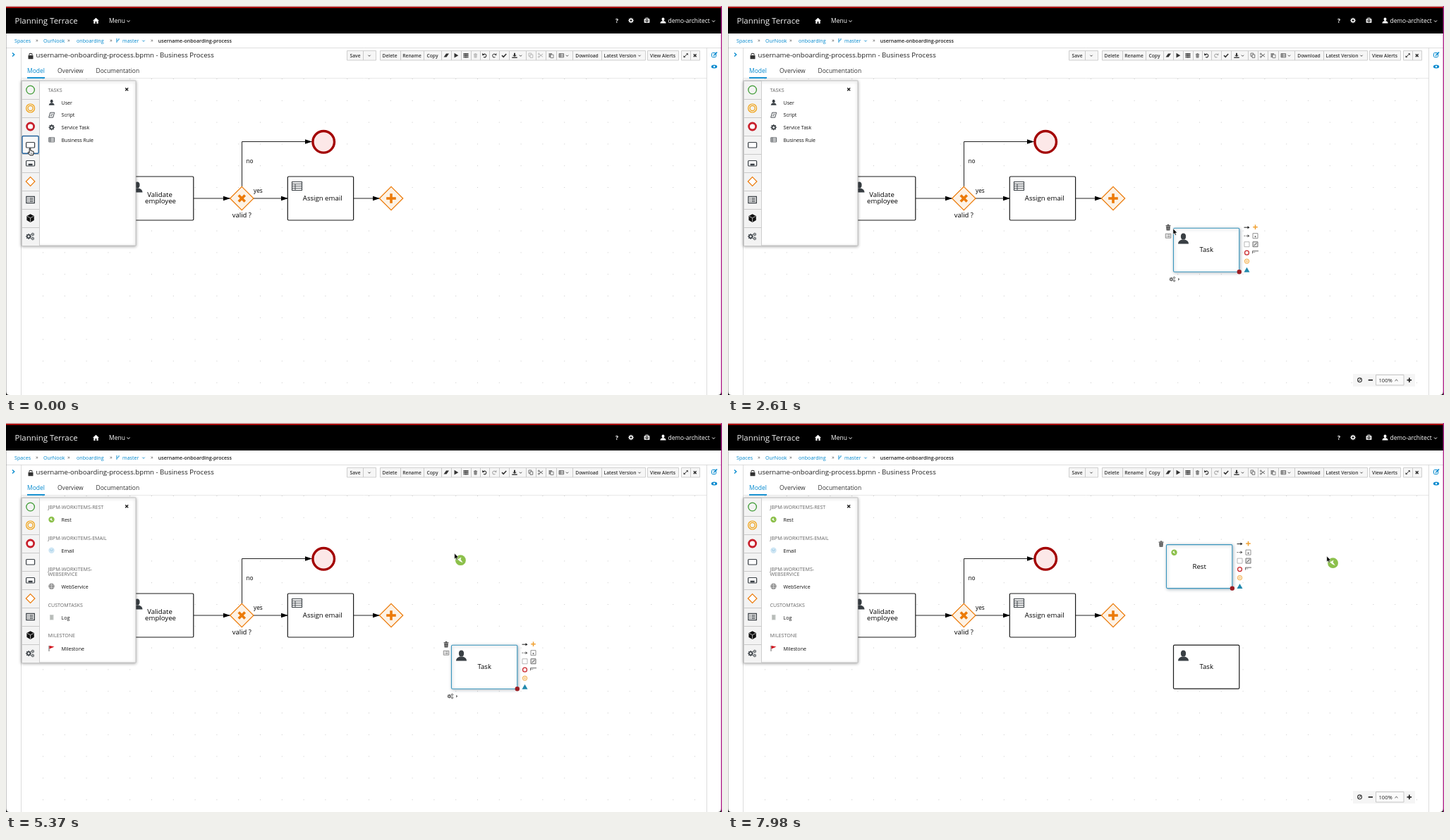
Animation, 1015 px wide and 552 px high, one loop 8000 ms. Source, as an HTML page with a canvas:

```html
<!DOCTYPE html>
<html lang="en">
<head>
<meta charset="utf-8">
<title>Process editor</title>
<style>
html, body { margin: 0; width: 100%; height: 100%; overflow: hidden; background: #fff; }
canvas { display: block; width: 1015px; height: 552px; }
</style>
</head>
<body>
<canvas id="stage"></canvas>
<script>
const W = 1015, H = 552, LOOP = 8000;
const canvas = document.getElementById('stage');
const c = canvas.getContext('2d');
const dpr = window.devicePixelRatio || 1;
canvas.width = W * dpr;
canvas.height = H * dpr;

const BLUE = '#0088ce', INK = '#393f44', ORANGE = '#ec7a08', RED = '#a30000', GREEN = '#8cc04b';

// Cursor path: time, x, y. Repeated points are pauses.
const path = [
  [0, 34, 202], [210, 34, 202], [570, 88, 137], [750, 88, 137], [810, 90, 138], [1080, 90, 138],
  [1950, 626, 215], [2420, 631, 316], [2700, 631, 316], [3300, 480, 333], [3850, 34, 324],
  [4290, 34, 324], [4410, 90, 191], [4640, 87, 139], [4930, 87, 139], [5370, 635, 185],
  [5640, 621, 173], [5970, 621, 173], [6780, 110, 141], [7200, 110, 141], [7980, 848, 189], [8000, 849, 189]
];
const drags = [[1100, 2480, 'user'], [4950, 5700, 'rest'], [7220, 8001, 'rest']];
const DROP_TASK = 2490, DROP_REST = 5700, OPEN_CUSTOM = 3930;

const clamp = v => Math.max(0, Math.min(1, v));
const ramp = (t, a, b) => clamp((t - a) / (b - a));

function slope(i, k) {
  const p = path[i - 1], q = path[i], r = path[i + 1];
  if (!p || !r) return 0;
  const still = (a, b) => a[1] === b[1] && a[2] === b[2];
  return still(p, q) || still(q, r) ? 0 : (r[k] - p[k]) / (r[0] - p[0]);
}

function cursorAt(t) {
  let i = 0;
  while (i < path.length - 2 && path[i + 1][0] <= t) i++;
  const a = path[i], b = path[i + 1], d = b[0] - a[0], u = clamp((t - a[0]) / d);
  return [1, 2].map(k => {
    const u2 = u * u, u3 = u2 * u;
    return (2 * u3 - 3 * u2 + 1) * a[k] + (u3 - 2 * u2 + u) * d * slope(i, k) +
      (3 * u2 - 2 * u3) * b[k] + (u3 - u2) * d * slope(i + 1, k);
  });
}

// Drawing helpers
function paint(fill, stroke, w = 1) {
  if (fill) { c.fillStyle = fill; c.fill(); }
  if (stroke) { c.strokeStyle = stroke; c.lineWidth = w; c.stroke(); }
}
function rect(x, y, w, h, fill, stroke, lw, r = 0) {
  c.beginPath();
  c.roundRect(x, y, w, h, r);
  paint(fill, stroke, lw);
}
function disc(x, y, r, fill, stroke, lw) {
  c.beginPath();
  c.arc(x, y, r, 0, 7);
  paint(fill, stroke, lw);
}
function poly(pts, fill, stroke, lw, open) {
  c.beginPath();
  for (let i = 0; i < pts.length; i += 2) c.lineTo(pts[i], pts[i + 1]);
  if (!open) c.closePath();
  paint(fill, stroke, lw);
}
const line = (pts, col, w = 1) => poly(pts, null, col, w, true);
function text(s, x, y, size, col = '#222', weight = 400, align = 'left') {
  c.font = `${weight} ${size}px "Open Sans", sans-serif`;
  c.fillStyle = col;
  c.textAlign = align;
  c.fillText(s, x, y + size * 0.36);
}
function at(x, y, s, draw) {
  c.save();
  c.translate(x, y);
  c.scale(s, s);
  draw();
  c.restore();
}
function shadowed(color, dx, draw) {
  c.save();
  c.shadowColor = color;
  c.shadowBlur = 4 * dpr;
  c.shadowOffsetX = dx * dpr;
  c.shadowOffsetY = dpr;
  draw();
  c.restore();
}
const chevron = (x, y, col, w = 1, s = 2) => line([x - s, y - s / 2, x, y + s / 2, x + s, y - s / 2], col, w);
const diamond = (x, y, r, fill, col, w) => poly([x, y - r, x + r, y, x, y + r, x - r, y], fill, col, w);

// Icons, each about ten units wide
const user = (x, y, s, col) => at(x, y, s, () => {
  c.beginPath();
  c.ellipse(0, -2, 2.4, 3, 0, 0, 7);
  paint(col);
  c.beginPath();
  c.moveTo(-5, 5);
  c.quadraticCurveTo(-5, 2, -1.4, 1);
  c.lineTo(1.4, 1);
  c.quadraticCurveTo(5, 2, 5, 5);
  paint(col);
});
const gear = (x, y, r, col) => {
  disc(x, y, r * 0.65, null, col, r * 0.45);
  for (let i = 0; i < 8; i++) {
    const a = i * Math.PI / 4, u = Math.cos(a), v = Math.sin(a);
    line([x + u * r * 0.8, y + v * r * 0.8, x + u * r * 1.15, y + v * r * 1.15], col, r * 0.4);
  }
};
const gears = (x, y, s, col) => {
  gear(x - 2 * s, y, 3.1 * s, col);
  gear(x + 3.2 * s, y - 2.7 * s, 1.9 * s, col);
  gear(x + 3.2 * s, y + 2.7 * s, 1.9 * s, col);
};
const table = (x, y, s, col) => at(x, y, s, () => {
  rect(-5, -4, 10, 8, null, col, 1);
  line([-5, -1.4, 5, -1.4], col, 0.9);
  line([-5, 1.3, 5, 1.3], col, 0.9);
  line([-2.2, -4, -2.2, 4], col, 0.9);
});
const form = (x, y, s, col) => at(x, y, s, () => {
  rect(-5, -4, 10, 8, null, col, 1.1);
  for (const v of [-1.9, 0.1, 2.1]) {
    rect(-3.4, v - 0.5, 1.2, 1, col);
    rect(-1.2, v - 0.5, 4.6, 1, col);
  }
});
const trash = (x, y, s, col) => at(x, y, s, () => {
  rect(-4, -3.6, 8, 1.4, col);
  rect(-1.5, -5, 3, 1.4, col);
  poly([-3.3, -1.6, 3.3, -1.6, 2.8, 5, -2.8, 5], col);
  line([-1, -0.5, -1, 4], '#fff', 0.5);
  line([1, -0.5, 1, 4], '#fff', 0.5);
});
const script = (x, y, col) => {
  poly([x - 2, y - 3.5, x + 4, y - 3.5, x + 2, y + 3.5, x - 4, y + 3.5], null, col, 0.9);
  line([x - 1, y - 1, x + 2, y - 1], col, 0.8);
  line([x - 2, y + 1, x + 1, y + 1], col, 0.8);
};
const rest = (x, y, r) => {
  disc(x, y, r, GREEN);
  at(x, y, r / 7, () => poly([-4, -1, 1, -4, 0, -1.2, 3, 3.5, -1, 1.5], '#fff'));
};
const cross = (x, y, r, col, w) => {
  line([x - r, y - r, x + r, y + r], col, w);
  line([x - r, y + r, x + r, y - r], col, w);
};
const plus = (x, y, r, col, w) => {
  line([x - r, y, x + r, y], col, w);
  line([x, y - r, x, y + r], col, w);
};
const turn = (x, y, dir, col) => {
  c.save();
  c.translate(x, y);
  c.scale(-dir, 1);
  c.beginPath();
  c.arc(0, 0.3, 2.3, -2.5, 2.3);
  paint(null, col, 1.1);
  poly([-3.4, -3.4, -3.4, 0, -0.3, -0.4], col);
  c.restore();
};

function header() {
  rect(0, 0, W, 39, '#000');
  rect(0, 0, W, 1, '#d8c8c8');
  rect(0, 1, W, 2, '#a80808');
  text('Planning Terrace', 12.5, 21, 11.5, '#f2f2f2');
  poly([123, 21, 127.5, 16.8, 132, 21, 130.7, 21, 130.7, 25, 128.4, 25, 128.4, 22, 126.6, 22, 126.6, 25, 124.3, 25, 124.3, 21], '#fff');
  text('Menu', 146, 20.5, 8.5, '#fff');
  chevron(173.5, 21.5, '#fff');
  text('?', 866, 20.5, 8.5, '#fff', 700, 'center');
  gear(886, 20.5, 3.2, '#fff');
  rect(904.5, 18, 8, 6, '#ddd', null, 0, 1);
  rect(906.8, 16.8, 3.4, 1.6, null, '#ddd', 0.8);
  disc(908.5, 21, 1.9, '#000');
  plus(908.5, 21, 1.3, '#ddd', 0.8);
  user(931.5, 20.5, 0.82, '#fff');
  text('demo-architect', 938.5, 20.5, 8.4, '#fff');
  chevron(1003, 21.5, '#fff');

  const crumb = [['Spaces', 12], ['OurNook', 53], ['onboarding', 100], ['master', 165]];
  for (const [s, x] of crumb) text(s, x, 49, 7.15, BLUE);
  for (const x of [42, 87, 147, 205]) text('»', x, 48.7, 7.5, '#555');
  line([157, 46, 157, 52], BLUE, 0.9);
  line([160, 46, 160, 48, 157, 50], BLUE, 0.9);
  chevron(195, 49.5, BLUE, 0.9, 1.7);
  text('username-onboarding-process', 215.8, 49, 7.05, '#222', 600);
}

function toolbar(t) {
  const on = t > DROP_TASK, soft = on ? '#666' : '#b4b4b4', ink = '#333';
  const cells = [[483, 506], [506, 524], [530, 559], [559, 592], [592, 617], [617, 631], [631, 645], [645, 659],
    [659, 672], [672, 685], [685, 699], [699, 713], [713, 737], [737, 751], [751, 765], [765, 780],
    [780, 803], [803, 844], [844, 906], [909, 953], [957, 970], [970, 983]];
  for (const [a, b] of cells) rect(a + 0.5, 63.5, b - a, 13.5, '#f6f6f6', '#c4c4c4', 0.8);
  const labels = [['Save', 495], ['Delete', 544], ['Rename', 575.5], ['Copy', 604.5], ['Download', 823.5],
    ['Latest Version', 870.5], ['View Alerts', 931]];
  for (const [s, x] of labels) text(s, x, 70.2, 6.7, ink, 600, 'center');
  for (const x of [515, 729.5, 795.5, 898]) chevron(x, 70.5, ink, 0.9, 1.6);
  poly([620.5, 72.5, 624, 67.5, 628, 67.5, 624.5, 72.5], ink);
  poly([635.5, 66.8, 641.3, 70.2, 635.5, 73.6], ink);
  for (let i = 0; i < 9; i++) rect(648.6 + i % 3 * 2.4, 67 + Math.floor(i / 3) * 2.3, 2, 1.8, ink);
  trash(665.5, 70.3, 0.66, soft);
  turn(678.5, 70.2, -1, ink);
  turn(692, 70.2, 1, on ? '#aaa' : '#555');
  line([703, 70.2, 705.2, 72.3, 709.2, 68], ink, 1.6);
  line([721, 66.8, 721, 70.5], ink, 2);
  poly([718, 69.7, 724, 69.7, 721, 72], ink);
  line([717.3, 73.2, 724.7, 73.2], ink, 1.4);
  rect(741, 67, 3.8, 4.3, null, soft, 0.9);
  rect(743, 69, 3.8, 4.3, '#f6f6f6', soft, 0.9);
  line([755.5, 68, 761, 72.2], soft, 1);
  line([755.5, 72.2, 761, 68], soft, 1);
  disc(755.3, 68, 1, null, soft, 0.8);
  disc(755.3, 72.2, 1, null, soft, 0.8);
  rect(769.5, 67, 4.5, 6, '#888');
  rect(772, 69, 4, 4.6, '#f6f6f6', '#777', 0.9);
  table(787.3, 70.2, 0.66, ink);
  line([961, 72.5, 966.2, 67.8], ink, 1);
  poly([966.8, 67.2, 966.8, 70, 964, 67.2], ink);
  poly([960.5, 73.1, 960.5, 70.3, 963.3, 73.1], ink);
  cross(976.7, 70.2, 1.9, ink, 1.5);
}

function frame(t) {
  rect(0, 0, W, H, '#fff');
  header();
  line([0, 59.5, W, 59.5], '#d6d6d6', 0.8);
  line([21.5, 59, 21.5, H], '#d4d4d4', 0.8);
  line([993.5, 59, 993.5, H], '#d4d4d4', 0.8);
  line([9, 66.5, 11.8, 69, 9, 71.5], BLUE, 1.3);

  rect(31.5, 70, 7, 5.3, '#333', null, 0, 0.6);
  c.beginPath();
  c.arc(35, 69.5, 2.2, Math.PI, 0);
  paint(null, '#333', 1.1);
  text('username-onboarding-process.bpmn - Business Process', 42.5, 70, 9.63, '#222');
  toolbar(t);
  text('Model', 30, 92, 8.5, BLUE);
  text('Overview', 73, 92, 8.5, '#333');
  text('Documentation', 127.5, 92, 8.5, '#333');
  line([22, 102.5, 993, 102.5], '#e2e2e2', 0.8);
  rect(30, 101, 25, 1.8, BLUE);

  rect(1000.5, 66.5, 6, 6, null, BLUE, 1, 1);
  line([1003, 70.5, 1008, 65.5], BLUE, 1.6);
  c.beginPath();
  c.ellipse(1004, 86, 4.2, 2.5, 0, 0, 7);
  paint(BLUE);
  disc(1004, 86, 1.3, '#fff');
}

function arrow(pts) {
  line(pts, '#222', 1);
  const [x, y] = pts.slice(-2);
  poly([x, y, x - 10, y - 3.2, x - 10, y + 3.2], '#000');
}

function task(x, y, label, selected, shift = 0) {
  const box = (col, w) => rect(x, y, 93.3, 62, '#fff', col, w, 1.5);
  if (selected) shadowed('rgba(40,70,90,.35)', 1, () => box('#3a96bf', 1.1));
  else box('#1a1a1a', 1.2);
  text(label, x + 46.7 + shift, y + 30.7, 9.6, '#000', 400, 'center');
}

// Quick actions around a selected node
function actions(x, y, full) {
  const r = x + 104, k = y - 1, ink = '#444';
  trash(x - 7.5, k, 0.85, ink);
  if (full) {
    form(x - 7.5, y + 11, 0.75, '#777');
    gears(x - 1.5, y + 72.5, 0.8, ink);
    poly([x + 6.5, y + 70.5, x + 9, y + 72.5, x + 6.5, y + 74.5], '#777');
  }
  line([r - 4, k, r + 2, k], '#222', 1);
  poly([r + 4, k, r + 1, k - 2, r + 1, k + 2], '#222');
  c.setLineDash([1.5, 1]);
  line([r - 4, k + 12, r + 2, k + 12], '#555', 1);
  c.setLineDash([]);
  poly([r + 4, k + 12, r + 1, k + 10, r + 1, k + 14], '#555');
  plus(r + 12, k - 0.5, 3.3, '#f0a030', 1.5);
  rect(r + 8.5, k + 8.5, 7, 7, null, '#777', 0.8);
  plus(r + 12, k + 13, 1.2, '#555', 0.8);
  rect(r - 3.5, k + 20.5, 7, 7, null, '#999', 0.7);
  rect(r + 8.5, k + 20.5, 7, 7, '#e4e4e4', '#666', 0.9);
  line([r + 10, k + 26, r + 14, k + 22], '#444', 1);
  disc(r, k + 36, 3, '#fdecec', '#c9282d', 1.2);
  line([r + 8, k + 37, r + 8, k + 33.5, r + 16.5, k + 33.5], '#555', 0.9);
  line([r + 8, k + 35.3, r + 12, k + 35.3], '#888', 0.7);
  disc(r, k + 48, 3.2, '#fff6e4', '#f0a030', 0.9);
  disc(r, k + 48, 1.2, null, '#f0a030', 0.6);
  poly([r, k + 56.5, r + 4, k + 63.5, r - 4, k + 63.5], '#2289ad');
  disc(x + 93.3, y + 62, 3.2, '#9c1c22');
}

function diagram(t) {
  c.fillStyle = '#c9c9c9';
  for (let y = 103; y < H; y += 30.8)
    for (let x = 52; x < 990; x += 30.8) c.fillRect(x, y, 1, 1);

  task(172.5, 242, '');
  user(186, 257, 1.5, INK);
  text('Validate', 218, 268, 9.6, '#000', 400, 'center');
  text('employee', 219, 277, 9.6, '#000', 400, 'center');
  arrow([266, 273, 318, 273]);
  arrow([334.5, 256, 334.5, 192.5, 434, 192.5]);
  arrow([351, 273, 400, 273]);
  arrow([492, 273, 530, 273]);
  diamond(334.3, 273, 16.7, '#fdf2e5', ORANGE, 1.2);
  cross(334.3, 273, 4.5, ORANGE, 3.6);
  diamond(546, 273, 16.7, '#fdf2e5', ORANGE, 1.2);
  plus(546, 273, 6.8, ORANGE, 3.6);
  disc(450.2, 192.8, 15.3, '#fce8e8', RED, 3.4);
  text('no', 340.5, 220, 8.3, '#000');
  text('yes', 351, 262.5, 8.3, '#000');
  text('valid ?', 334.3, 297, 9.5, '#000', 400, 'center');
  task(399.3, 242, 'Assign email', false, 2.7);
  rect(405.5, 249.5, 14, 12, null, INK, 1.1);
  for (const y of [252.6, 255.6, 258.6]) line([405.5, y, 419.5, y], INK, 0.9);
  line([410, 252.6, 410, 261.5], INK, 0.9);

  if (t > DROP_TASK) {
    const selected = t < DROP_REST;
    task(631.5, 315.2, 'Task', selected);
    user(645.5, 330, 1.5, INK);
    if (selected) actions(631.5, 315.2, true);
  }
  if (t > DROP_REST) {
    task(621.5, 172.6, 'Rest', true);
    rest(632.5, 183.7, 4.2);
    actions(621.5, 172.6, false);
  }
}

function palette(t) {
  const custom = t > OPEN_CUSTOM;
  shadowed('rgba(0,0,0,.35)', 0, () => rect(22, 106, 162, 234, '#fff', '#bbb', 0.8));
  for (let i = 0; i < 9; i++) rect(22.5, 106.5 + i * 26, 25, 26, '#f3f3f3', '#c3c3c3', 0.8);
  const focus = t < 1090 ? 3 : t > OPEN_CUSTOM && t < 4940 ? 8 : -1;
  if (focus >= 0) rect(23, 106.5 + focus * 26, 23.2, 24.8, '#f8f8f8', '#24639c', 1.4, 1.5);

  const x = 34.6;
  disc(x, 119, 5.8, null, '#3f9c35', 1.3);
  disc(x, 145, 6, null, '#f0a010', 1.2);
  disc(x, 145, 3.6, null, '#f0a010', 1.2);
  disc(x, 171, 5, '#fff', '#c8202c', 2.8);
  rect(x - 6, 193.5, 12, 7.5, '#fff', INK, 1.2, 1);
  rect(x - 6, 219.5, 12, 7.5, '#fff', INK, 1.2, 1);
  rect(x - 3, 223.7, 6, 2.6, INK);
  diamond(x, 249, 6.3, '#fff', ORANGE, 1.2);
  form(x, 275, 1.15, INK);
  poly([x, 295.3, x + 5.2, 298, x + 5.2, 304, x, 307, x - 5.2, 304, x - 5.2, 298], '#111');
  line([x - 4.6, 298.4, x, 300.8, x + 4.6, 298.4], '#ddd', 0.8);
  line([x, 300.8, x, 306.5], '#ddd', 0.8);
  gears(x - 0.3, 327, 1.1, INK);

  cross(171.2, 118.3, 2, '#222', 1.4);
  const head = (s, y) => text(s, 59.5, y, 7.1, '#666');
  const item = (s, y) => text(s, 78.5, y, 7.1, '#111');
  if (!custom) {
    head('TASKS', 119);
    ['User', 'Script', 'Service Task', 'Business Rule'].forEach((s, i) => item(s, 137.3 + i * 17.6));
    user(64.7, 136.8, 0.8, INK);
    script(64.7, 154.7, INK);
    gear(64.7, 172.2, 3.6, INK);
    table(64.7, 189.8, 0.78, INK);
    return;
  }
  head('JBPM-WORKITEMS-REST', 119);
  head('JBPM-WORKITEMS-EMAIL', 163);
  head('JBPM-WORKITEMS-', 207);
  head('WEBSERVICE', 214.8);
  head('CUSTOMTASKS', 258);
  head('MILESTONE', 301.7);
  item('Rest', 137.3);
  item('Email', 181);
  item('WebService', 232);
  item('Log', 276);
  item('Milestone', 320);
  rest(64.5, 137, 4.2);
  disc(64.5, 180.7, 4.2, '#cfe6f4');
  line([62, 179.5, 64.5, 181.5, 67, 179.5], '#8bbfe0', 0.8);
  disc(64.5, 231.7, 4.2, '#8c8c8c');
  for (const y of [230, 233.2]) line([61, y, 68, y], '#ddd', 0.7);
  line([64.5, 228, 64.5, 235.5], '#ddd', 0.7);
  rect(62, 272, 5.5, 7.5, '#c9cdca');
  for (const y of [274, 276, 278]) line([63, y, 66.5, y], '#909690', 0.6);
  line([61, 316, 61, 324], '#555', 0.9);
  poly([61.5, 316, 68.5, 317.5, 61.5, 320.5], '#d0121b');
}

function zoom(t) {
  const a = Math.max(
    ramp(t, 1500, 1650) * (1 - ramp(t, 3050, 3500)),
    ramp(t, 5520, 5670) * (1 - ramp(t, 6350, 6700)),
    ramp(t, 7550, 7700));
  if (!a) return;
  c.save();
  c.globalAlpha = a;
  rect(886, 522, 88, 18, '#f5f5f5');
  disc(895.5, 530.8, 2.9, null, '#333', 1.1);
  line([893.6, 532.7, 897.4, 528.9], '#333', 1);
  line([907.7, 530.8, 914, 530.8], '#222', 1.7);
  rect(918.5, 523.5, 39.5, 14.5, '#fafafa', '#bbb', 0.8);
  text('100%', 922.5, 530.9, 7.6, '#222');
  line([945.5, 532, 947.5, 530.2, 949.5, 532], '#333', 0.9);
  plus(965.8, 530.8, 3.3, '#222', 1.7);
  c.restore();
}

function pointer(t) {
  const [x, y] = cursorAt(t);
  const drag = drags.find(d => t >= d[0] && t < d[1]);
  if (drag && drag[2] === 'user') user(x + 4.5, y + 16.5, 1.5, '#4a4a4a');
  if (drag && drag[2] === 'rest') rest(x + 8.7, y + 9.6, 7.4);

  const rows = t > OPEN_CUSTOM ? [137, 181, 232, 276, 320] : [137, 155, 172, 190];
  const onItem = x > 48 && x < 184 && rows.some(v => Math.abs(y - v) < 8.5);
  const onButton = x > 22 && x <= 48 && y > 106 && y < 340;
  c.lineJoin = 'round';
  if (!drag && (onItem || onButton)) {
    at(x, y, 1, () => {
      poly([-0.8, 0, 0.8, 0, 1, 3.4, 5, 4.4, 5.2, 7, 4.2, 9.8, 0, 9.8, -3, 6.2, -2.4, 5.2, -0.8, 6.3], '#fff', '#111', 1);
      for (const v of [1.2, 2.8]) line([v, 6, v, 8.4], '#333', 0.6);
    });
  } else {
    at(x, y, 1, () => poly([0, 0, 0, 8, 1.8, 6.4, 3.1, 9.3, 4.4, 8.7, 3.2, 5.9, 5.7, 5.8], '#000', '#fff', 0.5));
  }
  c.lineJoin = 'miter';
}

function edges() {
  line([0.3, 39, 0.3, H], '#888', 0.6);
  rect(1013.6, 0, 1.4, H, '#b0268c');
  for (const [x, d] of [[0, 1], [1014, -1]]) {
    c.beginPath();
    c.moveTo(x, H);
    c.lineTo(x, H - 5);
    c.quadraticCurveTo(x, H, x + 5 * d, H);
    paint('#111');
  }
}

function render(now) {
  const t = (now - start) % LOOP;
  c.setTransform(dpr, 0, 0, dpr, 0, 0);
  frame(t);
  diagram(t);
  zoom(t);
  palette(t);
  pointer(t);
  edges();
}

const start = performance.now();
function tick() {
  render(performance.now());
  requestAnimationFrame(tick);
}
tick();
</script>
</body>
</html>
```
